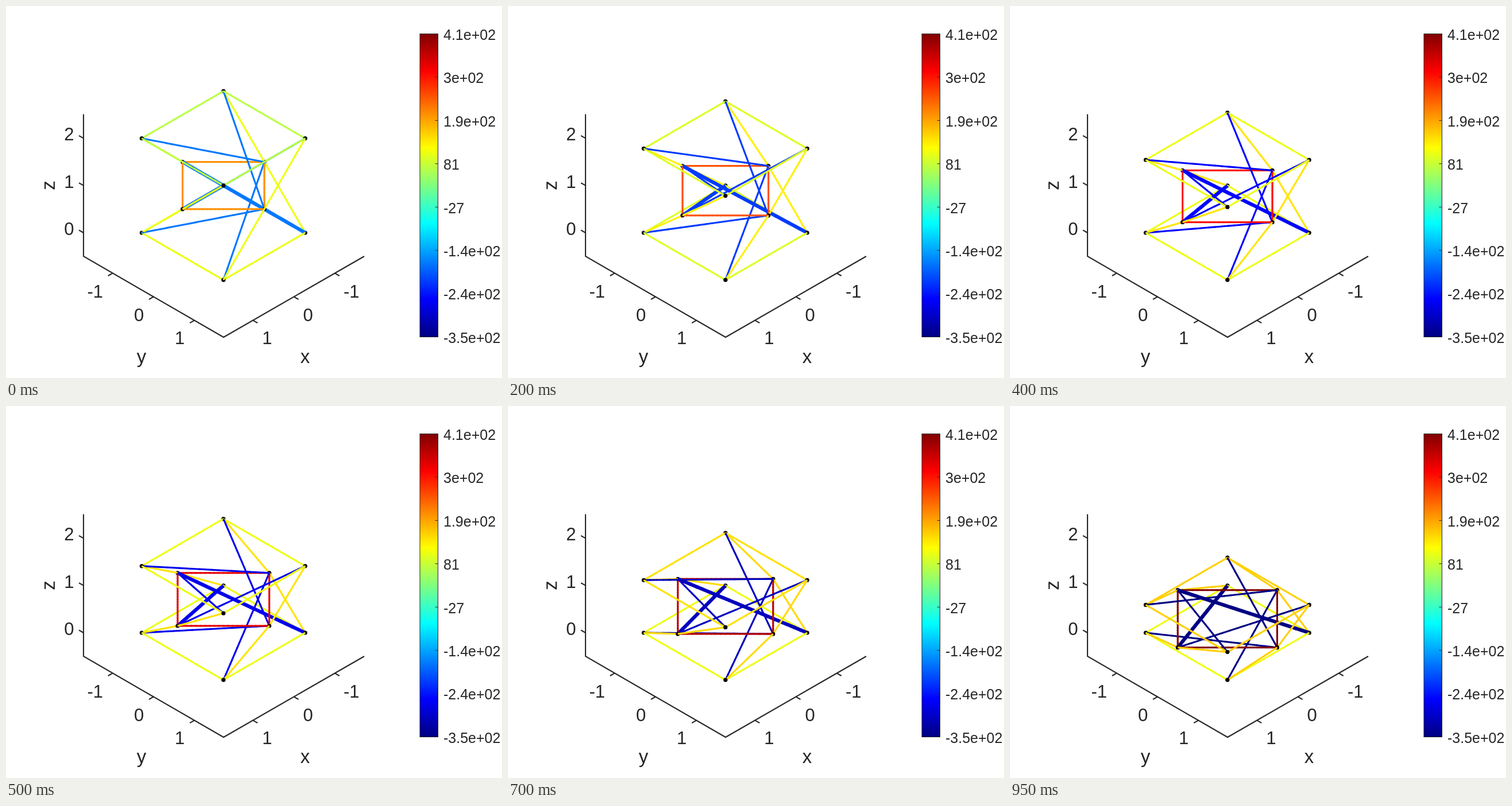
An HTML page with a canvas for the animation above (1000 ms loop, 864 by 648 pixels).

```html
<!DOCTYPE html>
<html lang="en">
<head>
<meta charset="utf-8">
<title>Tensegrity folding</title>
<style>
  html, body { margin: 0; width: 100%; height: 100%; overflow: hidden; background: #fff; }
  svg, canvas { position: absolute; left: 0; top: 0; width: 864px; height: 648px; }
  text { font-family: "Liberation Sans", Arial, sans-serif; fill: #262626; }
</style>
</head>
<body>
<svg id="axes" viewBox="0 0 864 648">
  <defs>
    <linearGradient id="jet" x1="0" y1="1" x2="0" y2="0">
      <stop offset="0" stop-color="#000080"/>
      <stop offset=".125" stop-color="#0000ff"/>
      <stop offset=".375" stop-color="#00ffff"/>
      <stop offset=".625" stop-color="#ffff00"/>
      <stop offset=".875" stop-color="#ff0000"/>
      <stop offset="1" stop-color="#800000"/>
    </linearGradient>
  </defs>
  <path d="M135 188.5V436L379 577L624 436" fill="none" stroke="#262626" stroke-width="2.1"/>
  <rect x="721" y="48.5" width="31.5" height="528" fill="url(#jet)" stroke="#262626" stroke-width="1"/>
</svg>
<canvas id="truss" width="864" height="648"></canvas>
<script>
const svg = document.getElementById('axes');
const ctx = document.getElementById('truss').getContext('2d');
const LOOP = 1000, STEP = 50, PIECES = 20;

function add(tag, attrs, content) {
  const el = document.createElementNS('http://www.w3.org/2000/svg', tag);
  for (const name in attrs) el.setAttribute(name, attrs[name]);
  if (content !== undefined) el.textContent = content;
  svg.appendChild(el);
}

function label(s, x, y, size, anchor = 'middle') {
  add('text', { x, y, 'font-size': size, 'text-anchor': anchor }, s);
}

function tick(x, y, dx, dy, width = 2.1) {
  add('path', { d: `M${x} ${y}l${dx} ${dy}`, stroke: '#262626', 'stroke-width': width });
}

function drawAxes() {
  for (const v of [-1, 0, 1]) {
    const s = String(v), shift = v * 71.2, y = 506.5 + v * 41.1;
    tick(257 + shift, y, -8, 4.6);
    tick(501.5 - shift, y, 8, 4.6);
    const nudge = v < 0 ? -5 : 0;
    label(s, 231.5 + shift + nudge, 548.5 + v * 40.2, 31);
    label(s, 526 - shift + (v < 0 ? 4.5 : 0), 548.5 + v * 40.2, 31);
    const z = v + 1;
    tick(135, 395 - z * 82.3, -8, -4.6);
    label(String(z), 118.5, 398.8 - z * 82.3, 31, 'end');
  }
  label('y', 236, 622, 33);
  label('x', 521, 622, 33);
  add('text', { transform: 'translate(84.5 312.5) rotate(-90)', 'font-size': 33, 'text-anchor': 'middle' }, 'z');
  ['4.1e+02', '3e+02', '1.9e+02', '81', '-27', '-1.4e+02', '-2.4e+02', '-3.5e+02'].forEach((s, i) => {
    const y = 48.5 + i * 528 / 7;
    tick(752.5, y, -5, 0, 1);
    label(s, 762, y + 10.3, 25, 'start');
  });
}

// Jet colormap, u from 0 to 1
function jet(u) {
  const ch = c => Math.round(255 * Math.max(0, Math.min(1, 1.5 - Math.abs(4 * u - c))));
  return `rgb(${ch(3)},${ch(2)},${ch(1)})`;
}

// Piecewise linear through [step, value] pairs
function ramp(points, k) {
  let i = 1;
  while (i < points.length - 1 && points[i][0] < k) i++;
  const [k0, v0] = points[i - 1], [k1, v1] = points[i];
  return v0 + (v1 - v0) * (k - k0) / (k1 - k0);
}

const stress = {
  bar: [[0, .243], [4, .183], [8, .128], [10, .106], [12, .084], [16, .04], [19, .003]],
  ring: [[0, .735], [4, .797], [8, .865], [10, .9], [12, .918], [16, .96], [19, .998]],
  base: [[0, .605], [4, .592], [8, .606], [19, .608]],
  top: [[0, .557], [4, .592], [8, .606], [11, .609], [12, .645], [16, .664], [19, .671]],
  side: [[0, .608], [4, .64], [8, .65], [12, .655], [16, .667], [19, .671]]
};

// Nodes 0-3 base, 4-7 top, 8-11 middle, each going round the vertical axis
const members = [];
for (let i = 0; i < 4; i++) {
  const j = (i + 1) % 4;
  members.push(['base', i, j], ['top', 4 + i, 4 + j], ['ring', 8 + i, 8 + j],
    ['side', i, 8 + i], ['side', 4 + j, 8 + i],
    ['bar', i, 8 + (i + 1) % 4, i === 0 || i === 3],
    ['bar', 4 + i, 8 + (i + 2) % 4]);
}

function nodesAt(k) {
  const cable = Math.SQRT2 - .01838 * k;
  const r = (6 - cable * cable) / 4;             // bars keep length sqrt(6)
  const h = 2 * Math.sqrt(5 - (1 + r) ** 2);
  const square = [[-1, -1], [1, -1], [1, 1], [-1, 1]];
  const cross = [[0, -r], [r, 0], [0, r], [-r, 0]];
  const lift = (ring, z) => ring.map(([x, y]) => ({
    x: 378.8 + (y - x) * 71.2,
    y: 395 + (x + y) * 41.1 - z * 82.25,
    d: x + y + z
  }));
  return [...lift(square, 0), ...lift(square, h), ...lift(cross, h / 2)];
}

function drawTruss(k) {
  const nodes = nodesAt(k);
  const parts = nodes.map(n => ({ node: n, d: n.d }));
  for (const [kind, a, b, thick] of members) {
    const p = nodes[a], q = nodes[b];
    const color = jet(ramp(stress[kind], k));
    const lap = .6 / Math.hypot(q.x - p.x, q.y - p.y);
    const at = s => [p.x + (q.x - p.x) * s, p.y + (q.y - p.y) * s];
    for (let i = 0; i < PIECES; i++) {
      parts.push({
        from: at(Math.max(0, i / PIECES - lap)),
        to: at(Math.min(1, (i + 1) / PIECES + lap)),
        d: p.d + (q.d - p.d) * (i + .5) / PIECES,
        color, width: thick ? 6.2 : 3.1
      });
    }
  }
  parts.sort((a, b) => Math.abs(a.d - b.d) < 1e-9 ? 0 : a.d - b.d);
  ctx.clearRect(0, 0, 864, 648);
  for (const part of parts) {
    ctx.beginPath();
    if (part.node) {
      ctx.fillStyle = '#000';
      ctx.arc(part.node.x, part.node.y, 3.6, 0, 7);
      ctx.fill();
    } else {
      ctx.strokeStyle = part.color;
      ctx.lineWidth = part.width;
      ctx.moveTo(...part.from);
      ctx.lineTo(...part.to);
      ctx.stroke();
    }
  }
}

let shown = -1;
const start = performance.now();
function update(now) {
  const k = Math.floor((Math.max(0, now - start) % LOOP) / STEP);
  if (k !== shown) drawTruss(shown = k);
  requestAnimationFrame(update);
}
drawAxes();
update(start);
</script>
</body>
</html>
```
